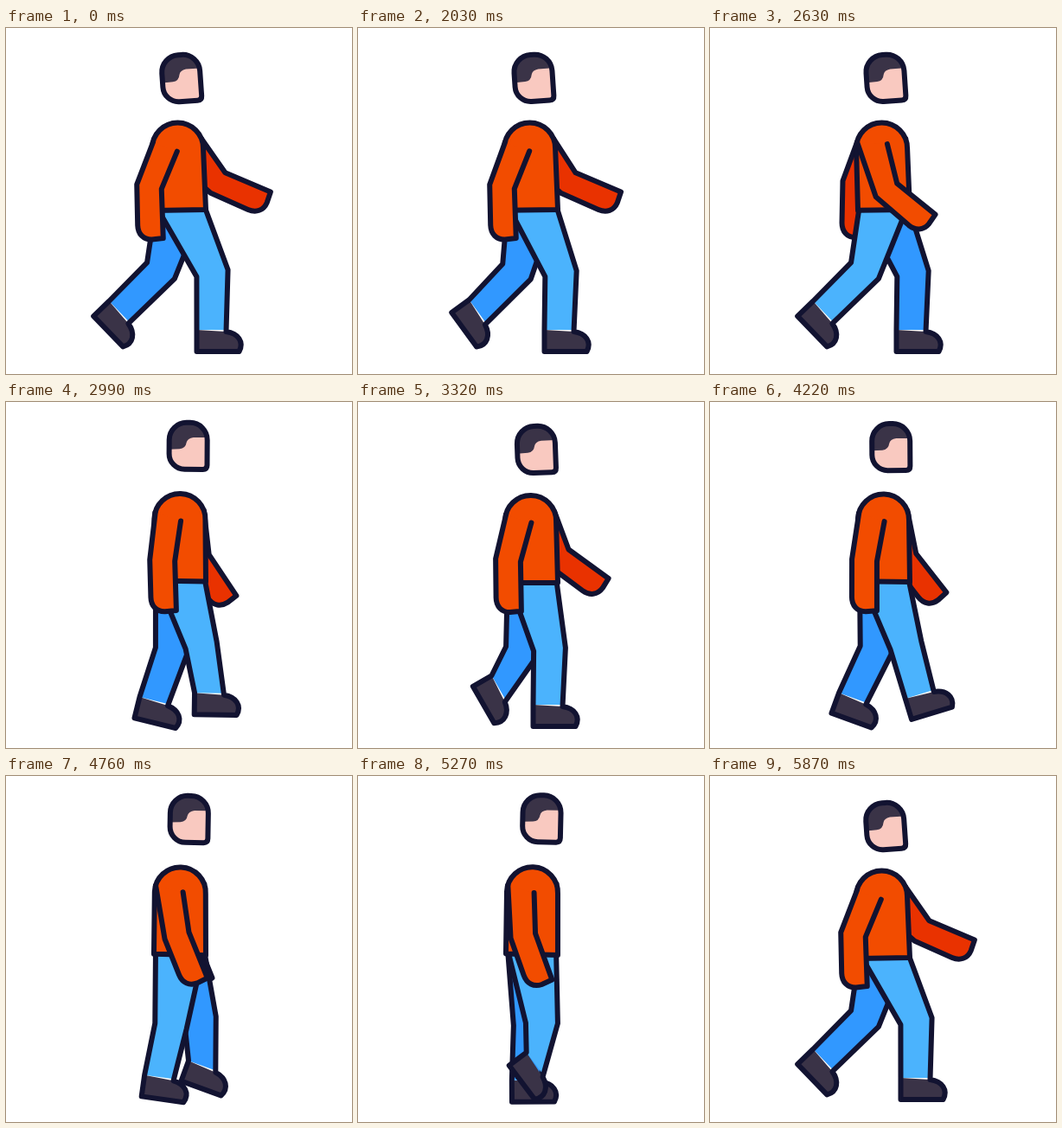
An HTML page with a canvas for the animation above (5.9 s loop, 400 px wide and 400 px high).

```html
<!DOCTYPE html>
<html lang="en">
<head>
<meta charset="utf-8">
<title>Walking</title>
<style>
  html, body { margin: 0; width: 100%; height: 100%; overflow: hidden; background: #fff; }
  canvas { display: block; width: 400px; height: 400px; }
</style>
</head>
<body>
<canvas width="400" height="400"></canvas>
<script>
const ctx = document.querySelector('canvas').getContext('2d');
const INK = '#121331', DARK = '#3a3347', SKIN = '#f9c9c0';
const LOOP = 5900, HOLD = 2000, STEP = 30, CYCLE = 40, SLOW_FROM = 100, LAST = 129;
const rad = Math.PI / 180;

// Rows: phase, knee x/y, ankle x/y, foot angle. "lag" delays the toe-off.
const stride = lag => [
  [0, 238.5, 283.5, 237.5, 349, 0],
  [.025, 234.5, 284, 232.5, 349, 0],
  [.1, 221.5, 286, 219.5, 350, 0],
  [.3, 190.5, 289, 177, 348, 8],
  [.35, 191.5, 287, 165, 342, 20],
  [.5 + lag, 179, 280.5, 131, 328, 46],
  [.525 + lag, 183.5, 281.5, 138.5, 328, 54],
  [.6, 188.5, 289, 163, 331, 60],
  [.8, 224.5, 281, 227, 335, 20],
  [.85, 226.5, 281.5, 242, 338, -17]
];
const nearStride = stride(.025), farStride = stride(0);

// Rows: phase, elbow x/y, forearm angle.
const nearSwing = [
  [0, 165.5, 183.5, 2], [.025, 166.5, 183.5, 2], [.1, 173.5, 183, 1],
  [.3, 197.5, 184.5, 22], [.525, 204, 187.5, 51], [.85, 178.5, 183, 0]
];
const farSwing = [
  [0, 245, 179, 67], [.025, 243, 179, 67], [.1, 233, 180.5, 54],
  [.3, 203, 184, 22], [.525, 167.5, 180.5, 0], [.85, 226, 183, 38]
];

// Smooth periodic interpolation through the rows.
function sample(rows, phase) {
  const n = rows.length, p = phase - Math.floor(phase);
  const at = i => rows[(i + n) % n];
  const time = i => at(i)[0] + Math.floor(i / n);
  let i = n - 1;
  while (rows[i][0] > p) i--;
  const h = time(i + 1) - time(i), s = (p - time(i)) / h;
  return rows[0].slice(1).map((_, c) => {
    const value = j => at(j)[c + 1];
    const slope = j => {
      const a = time(j) - time(j - 1), b = time(j + 1) - time(j);
      return ((value(j) - value(j - 1)) / a * b + (value(j + 1) - value(j)) / b * a) / (a + b);
    };
    const s2 = s * s, s3 = s2 * s;
    return value(i) * (2 * s3 - 3 * s2 + 1) + value(i + 1) * (3 * s2 - 2 * s3)
      + h * (slope(i) * (s3 - 2 * s2 + s) + slope(i + 1) * (s3 - s2));
  });
}

function paint(path, fill) {
  if (fill) { ctx.fillStyle = fill; ctx.fill(path); }
  else ctx.stroke(path);
}

function polyline(points) {
  const path = new Path2D();
  points.forEach(p => path.lineTo(...p));
  return path;
}

function leg(rows, phase, lift, color) {
  const [kx, ky, ax, ay, foot] = sample(rows, phase);
  const bend = (Math.atan2(kx - 201, ky - 205 + lift) + Math.atan2(ax - kx, ay - ky)) / 2;
  const dx = 18.5 * Math.cos(bend), dy = -18.5 * Math.sin(bend);
  const c = Math.cos(foot * rad), s = Math.sin(foot * rad);
  const onFoot = (x, y) => [ax + x * c - y * s, ay + x * s + y * c];
  const hipL = [173, 205 - lift], hipR = [229, 205 - lift];
  const kneeL = [kx - dx, ky - dy], kneeR = [kx + dx, ky + dy];
  const ankleL = onFoot(-17, 0), ankleR = onFoot(17, 2);
  const shoe = path => {
    path.lineTo(...ankleL);
    path.lineTo(...onFoot(-17, 25));
    path.lineTo(...onFoot(32, 25));
    path.bezierCurveTo(...onFoot(38, 14), ...onFoot(31, 4), ...ankleR);
    return path;
  };
  paint(polyline([hipL, kneeL, ankleL, onFoot(17, 0), kneeR, hipR]), color);
  paint(shoe(new Path2D()), DARK);
  const outline = shoe(polyline([hipL, kneeL]));
  outline.lineTo(...kneeR);
  outline.lineTo(...hipR);
  paint(outline);
}

function arm(rows, phase, pivotX, outerTop, innerTop, color) {
  const [ex, ey, angle] = sample(rows, phase);
  const upper = Math.atan2(ex - pivotX, ey - 127), fore = angle * rad;
  const bend = (upper + fore) / 2;
  const hx = 14.5 * Math.cos(bend), hy = -14.5 * Math.sin(bend);
  const inner = [ex + hx, ey + hy];
  const s = Math.sin(fore), c = Math.cos(fore);
  // Hand coordinates: "along" the forearm, "across" towards its outer side.
  const hand = (along, across) =>
    [inner[0] + along * s - across * c, inner[1] + along * c + across * s];
  const top = innerTop ||
    [inner[0] - 47 * Math.sin(upper), inner[1] - 47 * Math.cos(upper)];
  const path = polyline([outerTop, [ex - hx, ey - hy], hand(41, 29)]);
  path.bezierCurveTo(...hand(51, 29), ...hand(58, 23), ...hand(58, 13));
  path.lineTo(...hand(57, 0));
  path.lineTo(...inner);
  path.lineTo(...top);
  paint(path, color);
  paint(path);
}

const torso = new Path2D('M171 211L169 139A29.5 29.5 0 0 1 228 139L231 210Z');
const face = new Path2D('M-22-7A20 20 0 0 1-2-27H2A20 20 0 0 1 22-7V22Q22 27 17 27H-4A18 18 0 0 1-22 9Z');
const hair = new Path2D('M-22 4V-7A20 20 0 0 1-2-27H2A20 20 0 0 1 22-10H6Q-1-9-2-4Q-3 3-10 3.5Z');

function placed(x, y, degrees, draw) {
  ctx.save();
  ctx.translate(x, y);
  ctx.rotate(degrees * rad);
  draw();
  ctx.restore();
}

function walkPhase(k) {
  if (k <= SLOW_FROM) return k / CYCLE;
  const x = (k - SLOW_FROM) / (LAST - SLOW_FROM);
  return 2.5 + .5 * (1.45 * x + .1 * x * x - .55 * x * x * x);
}

function draw(now) {
  const k = Math.max(0, Math.floor((now % LOOP - HOLD) / STEP));
  const phase = walkPhase(k);
  const rise = (1 - Math.cos(4 * Math.PI * phase)) / 2;
  const lift = 4.5 * rise, lean = 2.5 * rise;
  const shoulder = (x, y) => {
    const a = lean * rad;
    return [200 + (x - 200) * Math.cos(a) - (y - 210) * Math.sin(a),
      210 - lift + (x - 200) * Math.sin(a) + (y - 210) * Math.cos(a)];
  };

  ctx.fillStyle = '#fff';
  ctx.fillRect(0, 0, 400, 400);
  ctx.strokeStyle = INK;
  ctx.lineWidth = 6;
  ctx.lineJoin = ctx.lineCap = 'round';

  arm(farSwing, phase, 198, shoulder(170, 132), shoulder(226, 128), '#e93200');
  leg(farStride, phase + .5, lift, '#3198ff');
  leg(nearStride, phase, lift, '#4bb3fd');
  placed(200, 210 - lift, lean, () => {
    ctx.translate(-200, -210);
    paint(torso, '#f24c00');
    paint(torso);
  });
  arm(nearSwing, phase, 189, shoulder(170, 132), null, '#f24c00');
  placed(202.7 + 10 * rise, 58 - 9 * rise, 5.5 * rise - 4, () => {
    paint(face, SKIN);
    paint(hair, DARK);
    paint(face);
  });
  requestAnimationFrame(draw);
}
requestAnimationFrame(draw);
</script>
</body>
</html>
```
